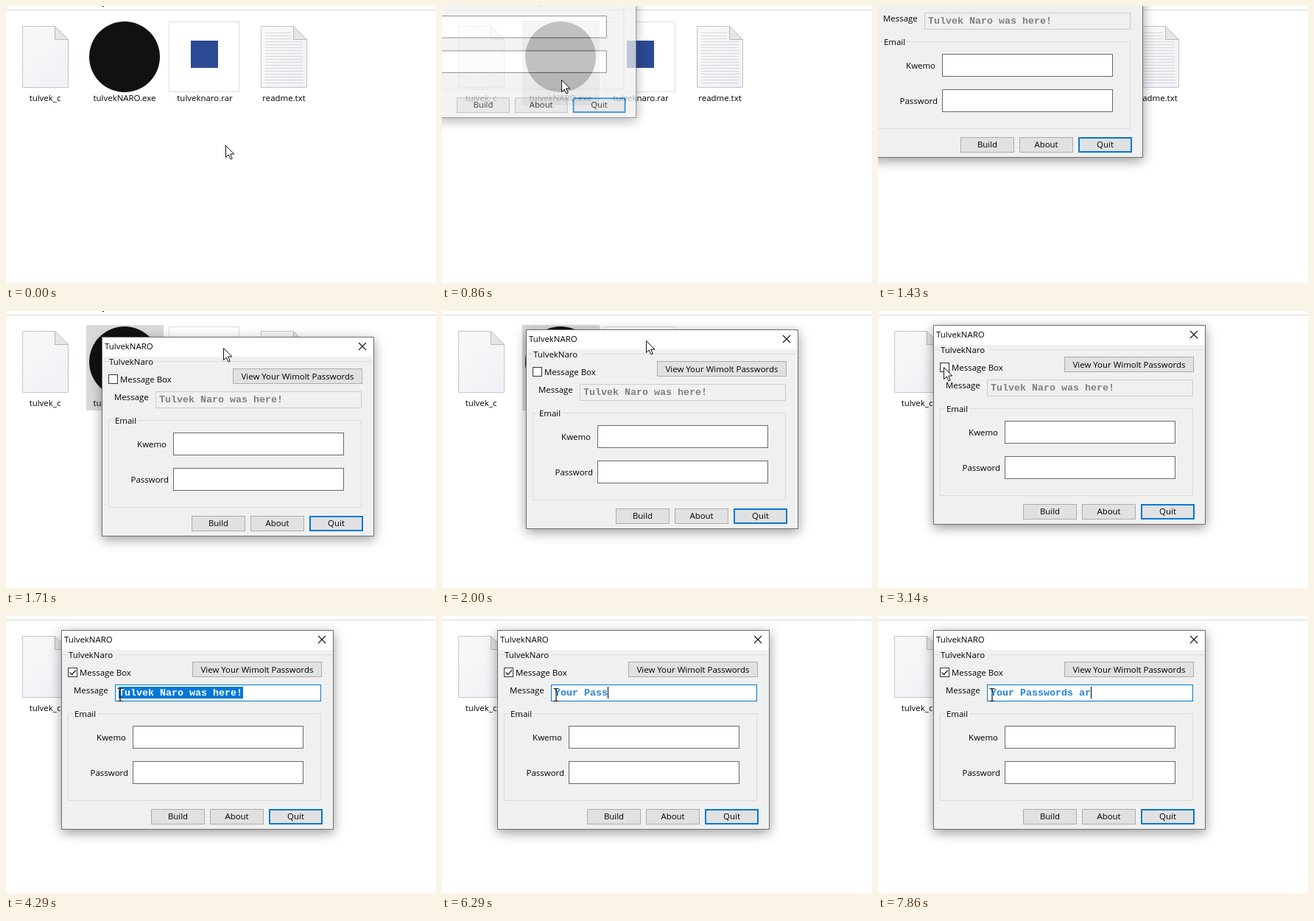
Animation, 584 px wide and 376 px high, one loop 8000 ms. Source, as an HTML page:

```html
<!DOCTYPE html>
<html lang="en">
<head>
<meta charset="utf-8">
<title>Dialog demo</title>
<style>
  html, body { margin: 0; width: 100%; height: 100%; overflow: hidden; background: #fff; }
  svg { display: block; font: 11.45px "Open Sans", "Noto Sans", sans-serif; }
  .mid { text-anchor: middle; }
  .page { fill: url(#paper); stroke: #c4c4c4; }
  .button { fill: #e1e1e1; stroke: #adadad; }
  .input { fill: #fff; stroke: #6a6a6a; }
  .group { fill: none; stroke: #dcdcdc; }
  .mono { font: bold 13.333px "Liberation Mono", "Courier New", monospace; white-space: pre; }
  #dialog { filter: drop-shadow(0 4px 8px rgba(0, 0, 0, .4)); }
</style>
</head>
<body>
<svg width="584" height="376" viewBox="0 0 584 376">
  <defs>
    <linearGradient id="paper" x2="1" y2="1">
      <stop stop-color="#f9f9fa"/><stop offset="1" stop-color="#eff1f5"/>
    </linearGradient>
    <g id="sheet">
      <path class="page" d="M.5 .5H44.5L62.5 18.5V83.5H.5z"/>
      <path d="M44.5 .5V18.5H62.5z" fill="#e6e6e8" stroke="#b8b8b8"/>
    </g>
  </defs>

  <path d="M0 5.5H584" stroke="#d9d9d9"/>
  <rect id="tail" x="131" width="2" height="1" fill="#222"/>
  <rect id="picked" x="109" y="19" width="105" height="116"/>
  <use href="#sheet" x="22" y="27"/>
  <circle cx="161" cy="69" r="48" fill="#111"/>
  <rect x="221.5" y="21.5" width="95" height="95" fill="#fff" stroke="#ddd"/>
  <rect x="251" y="47" width="37" height="37" fill="#2b4a94"/>
  <use href="#sheet" x="346" y="27"/>
  <path id="lines" stroke="#d6d7da"/>
  <g class="mid">
    <text x="53" y="129">tulvek_c</text>
    <text x="161" y="129">tulvekNARO.exe</text>
    <text x="270" y="129">tulveknaro.rar</text>
    <text x="377.5" y="129">readme.txt</text>
  </g>

  <g id="dialog">
    <rect x=".5" y=".5" width="369" height="270" fill="#f0f0f0" stroke="#707070"/>
    <rect x="1" y="1" width="368" height="26" fill="#fff"/>
    <text x="4" y="17">TulvekNARO</text>
    <path d="M349 8l10 10m0-10l-10 10" stroke="#111" stroke-width="1.1"/>

    <path class="group" d="M2 33.5H9M77 33.5H367"/>
    <text x="10" y="38">TulvekNaro</text>
    <rect x="9.5" y="51.5" width="12" height="12" fill="#fff" stroke="#333"/>
    <path id="check" d="M11.5 57.5l3 3 5.5-6" fill="none" stroke="#222" stroke-width="1.3"/>
    <text x="25" y="62">Message Box</text>
    <rect class="button" x="178.5" y="43.5" width="175" height="20"/>
    <text class="mid" x="266" y="58">View Your Wimolt Passwords</text>

    <text x="17" y="86">Message</text>
    <rect id="field" x="73.5" y="74.5" width="279" height="22"/>
    <rect id="mark" y="77" height="16" fill="#0078d7"/>
    <text class="mono" x="78" y="89"><tspan id="plain"></tspan><tspan id="marked" fill="#fff"></tspan></text>
    <rect id="caret" y="77" width="1" height="16"/>

    <rect class="group" x="9.5" y="113.5" width="343" height="118"/>
    <rect x="16" y="108" width="33" height="12" fill="#f0f0f0"/>
    <text x="18" y="118">Email</text>
    <text x="88" y="150" text-anchor="end">Kwemo</text>
    <text x="91" y="198" text-anchor="end">Password</text>
    <rect class="input" x="97.5" y="130.5" width="231" height="30"/>
    <rect class="input" x="97.5" y="178.5" width="231" height="30"/>

    <rect class="button" x="122.5" y="243.5" width="72" height="20"/>
    <rect class="button" x="202.5" y="243.5" width="72" height="20"/>
    <rect x="283" y="244" width="71" height="19" fill="#e1e1e1" stroke="#0078d7" stroke-width="2"/>
    <g class="mid">
      <text x="158.5" y="257">Build</text>
      <text x="238.5" y="257">About</text>
      <text x="318.5" y="257">Quit</text>
    </g>
  </g>

  <path id="arrow" d="M.5 .5V16.5L4.2 13 7 19 9.3 18 6.6 12H11.8z" fill="#fff" stroke="#111"/>
  <path id="beam" d="M-3.5-8.5H-1L0-7.5 1-8.5H3.5M0-7.5V7.5M-3.5 8.5H-1L0 7.5 1 8.5H3.5" fill="none" stroke="#111" stroke-width="1.2"/>
</svg>

<script>
const LOOP = 8000, FPS = 7;
const OLD = "Tulvek Naro was here!", TYPED = "Your Passwords ar";
const CHAR = 8, TEXT_X = 78;

// [step, x, y]
const dialogPath = [[6, -103, -117], [9, -103, -117], [11, 82, -13], [12, 130, 35], [16, 97, 15], [18, 75, 19]];
const cursorPath = [
  [3, 298, 189], [5, 163, 103], [6, 162, 100], [7, 162, 100], [9, 61, -103], [11, 246, 1], [12, 295, 50],
  [16, 258, 30], [18, 236, 33], [19, 236, 33], [22, 89, 76], [26, 89, 76], [28, 380, 104], [30, 155, 107]
];
// [step, characters typed]
const typing = [[36, 1], [37, 2], [38, 3], [39, 4], [40, 5], [42, 6], [43, 7], [44, 9], [45, 10],
  [46, 11], [47, 12], [48, 13], [49, 15], [53, 16], [55, 17]];

const $ = id => document.getElementById(id);
const set = (id, attrs) => { for (const k in attrs) $(id).setAttribute(k, attrs[k]); };
const show = (id, on) => { $(id).style.display = on ? "" : "none"; };

function along(path, n) {
  if (n <= path[0][0]) return path[0].slice(1);
  const i = path.findIndex(p => p[0] > n);
  if (i < 0) return path[path.length - 1].slice(1);
  const [a, b] = [path[i - 1], path[i]], k = (n - a[0]) / (b[0] - a[0]);
  return [1, 2].map(j => Math.round(a[j] + (b[j] - a[j]) * k));
}

let ruled = "";
for (let y = 36.5; y < 106; y += 4) ruled += `M352 ${y}H${y < 47 ? 387 : 403}`;
set("lines", { d: ruled });

function draw(n) {
  const [x, y] = along(dialogPath, n), [cx, cy] = along(cursorPath, n);
  const opening = n === 6, checked = n >= 25, focused = n >= 28, editing = n >= 33;

  show("tail", n < 13);
  show("picked", n >= 5);
  set("picked", { fill: n === 5 ? "#cce8ff" : "#d9d9d9" });

  show("dialog", n >= 6);
  set("dialog", {
    transform: `translate(${x} ${y})` + (opening ? " translate(185 135) scale(.985) translate(-185 -135)" : ""),
    opacity: opening ? .74 : 1
  });
  show("check", checked);
  set("field", { fill: checked ? "#fff" : "#f0f0f0", stroke: focused ? "#0078d7" : checked ? "#7a7a7a" : "#ccc" });

  const count = typing.reduce((c, [step, len]) => n >= step ? len : c, 0);
  const text = editing ? TYPED.slice(0, count) : OLD;
  const from = focused && !editing
    ? Math.max(0, Math.min(text.length, Math.round((cx - x - TEXT_X) / CHAR)))
    : text.length;
  $("plain").textContent = text.slice(0, from);
  $("marked").textContent = text.slice(from);
  set("plain", { fill: checked ? "#2583d6" : "#808080" });
  set("mark", { x: TEXT_X + from * CHAR, width: (text.length - from) * CHAR + (from < text.length ? 1 : 0) });
  show("caret", editing && n !== 50 && n !== 51);
  set("caret", { x: TEXT_X + count * CHAR });

  show("arrow", !focused);
  show("beam", focused);
  set(focused ? "beam" : "arrow", { transform: `translate(${cx} ${cy})` });
}

const start = performance.now();
function tick() {
  const t = (performance.now() - start) % LOOP;
  draw(Math.min(55, Math.floor((t + 5) * FPS / 1000)));
  requestAnimationFrame(tick);
}
tick();
</script>
</body>
</html>
```
